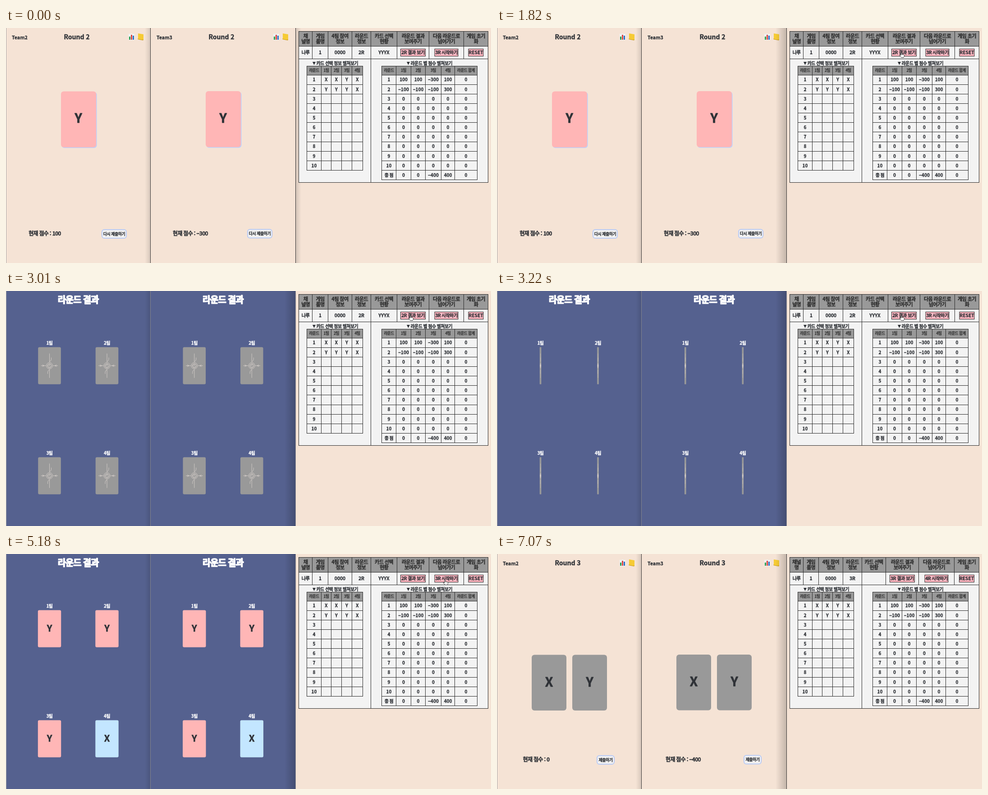
An HTML page for the animation above (7420 ms loop, 1076 by 521 pixels).

```html
<!DOCTYPE html>
<html lang="ko">
<head>
<meta charset="utf-8">
<style>
  html, body { margin: 0; width: 100%; height: 100%; overflow: hidden; background: #f5e3d5; }
  svg { display: block; width: 1076px; height: 521px; }
  text {
    font-family: "Noto Sans CJK KR", "Noto Sans CJK", "Noto Sans", sans-serif; font-weight: 700;
    stroke-width: .03em; stroke-linejoin: round;
  }
  .ko { letter-spacing: -.06em; }
  .title { font-weight: 900; stroke-width: .07em; }
  .divider { fill: #333; }
  .dim .divider { fill: #85878f; }
</style>
</head>
<body>
<svg id="stage" viewBox="0 0 1076 521"></svg>
<script>
const LOOP = 7420, RESULT_AT = 1890, FLIP_AT = 2939, FLIP_TIME = 1000, NEXT_AT = 5390, FOCUS_AT = 1200;
const INK = '#2f3237', LINE = '#2a2a2a', GRAY = '#999', PINK = '#ffb6b6', SKY = '#c3e6ff', BLUE = '#55618f';

const rect = (x, y, w, h, fill, extra = '') =>
  `<rect x="${x}" y="${y}" width="${w}" height="${h}" fill="${fill}" ${extra}/>`;
const path = (d, extra) => `<path d="${d}" ${extra}/>`;
const group = (id, body) => `<g id="${id}">${body}</g>`;
// y is the visual middle of the line; negative numbers get a true minus sign
const text = (x, y, size, s, fill = INK, anchor = 'middle', style = '') =>
  `<text x="${x}" y="${y + size * .36}" font-size="${size}" fill="${fill}" stroke="${fill}" text-anchor="${anchor}"` +
  ` class="${/[가-힣]/.test(s) ? 'ko' : ''} ${style}">${String(s).replace('-', '−')}</text>`;

function icons(x) {
  const bar = (dx, h, fill) => rect(x + dx, 26 - h, 3, h, fill);
  return rect(x, 13, 13, 14, '#eef3f6') + bar(1, 7, '#2f9e4f') + bar(5, 11, '#d9433f') + bar(9, 9, '#2b6fc4') +
    path(`M${x + 21} 12l12 2v13l-12-2z`, 'fill="#f6cb34"') +
    path(`M${x + 20} 24l2 1 10 2v-2`, 'fill="none" stroke="#c99a1c"');
}

function pill(cx, y, w, label) {
  return rect(cx - w / 2, y, w, 19, '#f2f1f1', 'rx="5" stroke="#b9cbf5" stroke-width="2"') +
    text(cx, y + 9.5, 9, label);
}

function roundPanel(p, round) {
  const x = p * 321, y = p * -.5, first = round === 2;
  const score = first ? [100, -300][p] : [0, -400][p];
  const cards = first
    ? rect(x + 123.5, y + 142, 78, 124, '#bdcffa', 'rx="6"') +
      rect(x + 122, y + 140.5, 78, 124, PINK, 'rx="6"') + text(x + 160.5, 200, 28, 'Y')
    : ['X', 'Y'].map((c, i) => rect(x + 77 + i * 90, y + 223.5, 77, 123.5, GRAY, 'rx="6"') +
        text(x + 115.5 + i * 90, y + 283.5, 28, c)).join('');
  return text(x + 13, 21, 10.7, 'Team' + (p + 2), INK, 'start') +
    text(x + 157, 20, 14, 'Round ' + round) + icons(x + 272) + cards +
    text((first ? 86 : 87) + p * (first ? 323 : 326), 456 + y, 12, '현재 점수 : ' + score) +
    (first ? pill(240 + p * 323, 447 + y, 54, '다시 제출하기') : pill(241 + p * 326, 447 + y, 38, '제출하기'));
}

const cardBack = rect(-25.7, -41.2, 51.4, 82.4, GRAY, 'rx="3"') +
  '<g fill="none" stroke="#e2dad4" stroke-width=".75">' +
  path('M0-27V-8M0 8V27M-19 0H-8M8 0H19M-16-2l4 2-4 2M16-2l-4 2 4 2M0-9Q5-11 4-18M0 9Q-5 11-4 18' +
       'M-3 1A3 3 0 0 1 3-1M3 1A3 3 0 0 1-3 2M0-2V2', '') +
  '<circle r="7"/><circle r="4.6"/></g>';

function resultPanel(p) {
  const x = p * 321.3;
  return rect(p ? 320 : 1, 0, p ? 322 : 319, 521, BLUE) +
    text(x + 160, 19.5, 20, '라운드 결과', '#fff', 'middle', 'title') +
    [...'YYYX'].map((c, i) => {
      const cx = x + 96.5 + i % 2 * 127.5, cy = 165.6 + (i >> 1) * 244;
      return text(cx, cy - 50.5, 10, i + 1 + '팀', '#fff') +
        `<g transform="translate(${cx} ${cy})"><g class="card"><g>${cardBack}</g>` +
        `<g>${rect(-25.7, -41.2, 51.4, 82.4, c === 'X' ? SKY : PINK, 'rx="3"')}${text(0, -1, 20, c)}</g></g></g>`;
    }).join('');
}

function grid(xs, ys) {
  const d = xs.map(x => `M${x + .5} ${ys[0]}V${ys.at(-1) + 1}`).join('') +
    ys.map(y => `M${xs[0]} ${y + .5}H${xs.at(-1) + 1}`).join('');
  return path(d, `fill="none" stroke="${LINE}"`);
}

function scoreTable(xs, heads, rows) {
  const ys = [84];
  for (let i = 0; i <= rows.length; i++) ys.push(Math.floor(104 + i * 21.15));
  const cells = (list, y, size, fill) =>
    list.map((s, i) => text((xs[i] + xs[i + 1]) / 2 + .5, y, size, s, fill)).join('');
  return rect(xs[0], 84, xs.at(-1) - xs[0], 20, GRAY) + cells(heads, 94, 8.6, '#393939') +
    rows.map((r, i) => cells(r, 114.8 + i * 21.15, 10)).join('') + grid(xs, ys);
}

function topTable(round) {
  const first = round === 2;
  const xs = first ? [649, 679, 714, 767, 809, 867, 938, 1015, 1069] : [649, 679, 713, 767, 809, 862, 935, 1014, 1069];
  const heads = [first ? '채|널명' : '채널|명', '게임|룸명', '4팀 참여|정보', '라운드|정보', '카드 선택|현황',
    '라운드 결과|보여주기', '다음 라운드로|넘어가기', '게임 초기|화'];
  const values = ['나루', '1', '0000', round + 'R', first ? 'YYYX' : '',
    round + 'R 결과 보기', round + 1 + 'R 시작하기', 'RESET'];
  const widths = [55, 52, 33];
  return rect(649, 7, 421, 33, GRAY) + heads.map((h, i) => {
    const cx = (xs[i] + xs[i + 1]) / 2 + .5;
    return h.split('|').map((s, j) => text(cx, 17.8 + j * 11.8, 11.2, s, '#303030')).join('') +
      (i > 4 ? rect(cx - widths[i - 5] / 2, 46.5, widths[i - 5], 16, '#ffb6c1', `stroke="${LINE}"`) : '') +
      text(cx, 54.5, 10.3, values[i]);
  }).join('') + grid(xs, [7, 40, 68]);
}

function scorePanel() {
  const picks = ['XXYX', 'YYYX'], points = [[100, 100, -300, 100], [-100, -100, -100, 300]];
  const rounds = Array.from({ length: 10 }, (_, i) => i + 1), teams = ['1팀', '2팀', '3팀', '4팀'];
  const title = (x, s) => path(`M${x} 75h7l-3.5 7z`, `fill="${INK}"`) + text(x + 8.5, 78.5, 10, s, INK, 'start');
  return rect(649, 7, 421, 336, '#f3f3f3') +
    title(680, '카드 선택 정보 펼쳐보기') + title(889, '라운드 별 점수 펼쳐보기') +
    scoreTable([667, 699, 721, 744, 767, 791], ['라운드', ...teams], rounds.map(n => [n, ...(picks[n - 1] || '')])) +
    scoreTable([833, 865, 898, 930, 965, 995, 1045], ['라운드', ...teams, '라운드 합계'],
      [...rounds.map(n => [n, ...(points[n - 1] || [0, 0, 0, 0]), 0]), ['총 점', 0, 0, -400, 400, 0]]) +
    grid([649, 809, 1069], [68, 342]);
}

const shade = (id, from, to) => `<linearGradient id="${id}">
  <stop offset="0" stop-opacity="${from}"/><stop offset="1" stop-opacity="${to}"/></linearGradient>`;
const cursorStyle = 'fill="#fff" stroke="#222" stroke-width=".9" stroke-linejoin="round"';
const divider = x => rect(x, 0, 1, 521, '#333', 'class="divider"');

stage.innerHTML = `<defs>${shade('toRight', 0, .2)}${shade('toLeft', .14, 0)}</defs>` +
  rect(0, 0, 1076, 521, '#f5e3d5') +
  group('round2', roundPanel(0, 2) + roundPanel(1, 2)) +
  group('round3', roundPanel(0, 3) + roundPanel(1, 3)) +
  group('result', resultPanel(0) + resultPanel(1)) +
  rect(308, 0, 12, 521, 'url(#toRight)', 'opacity=".6"') +
  rect(618, 0, 24, 521, 'url(#toRight)', 'id="rightFocus"') +
  rect(643, 0, 12, 521, 'url(#toLeft)', 'id="leftFocus"') +
  rect(0, 0, 1, 521, '#aaa') + divider(320) + divider(642) +
  scorePanel() + group('top2', topTable(2)) + group('top3', topTable(3)) +
  group('cursor',
    group('arrow', path('M0 0v11l2.6-2.4 1.8 4 1.7-.8-1.8-3.8h3.6z', 'fill="#111" stroke="#fff" stroke-width=".8"')) +
    group('hand', path('M-1 1q1-1.6 2 0v4q1-1 2 0 1-.8 2 .2 1.6-.5 1.6 1v2.5l-1.3 2.8H0L-3.8 7q0-1.6 1.4-1L-1 7z', cursorStyle)));

const cursorPath = [[300, 560, 535], [840, 625, 400], [1540, 897, 56], [1610, 897, 54], [4000, 897, 54],
  [4200, 953, 57], [4270, 953, 57], [4620, 974, 57], [5880, 974, 57], [6300, 1000, 398]];
const cards = [...document.querySelectorAll('.card')];
const $ = id => document.getElementById(id);
const show = (el, on) => el.style.display = on ? '' : 'none';

// cubic-bezier(.25, .1, .25, 1)
function ease(x) {
  if (x <= 0 || x >= 1) return x <= 0 ? 0 : 1;
  const bezier = (s, a, b) => 3 * s * (1 - s) ** 2 * a + 3 * s * s * (1 - s) * b + s ** 3;
  let lo = 0, hi = 1;
  for (let i = 0; i < 24; i++) {
    const mid = (lo + hi) / 2;
    if (bezier(mid, .25, .25) < x) lo = mid; else hi = mid;
  }
  return bezier(lo, .1, 1);
}

function moveCursor(t) {
  const i = cursorPath.findIndex(k => k[0] > t);
  show($('cursor'), i > 0);
  if (i < 1) return;
  const [t0, x0, y0] = cursorPath[i - 1], [t1, x1, y1] = cursorPath[i];
  const u = (t - t0) / (t1 - t0), k = u * u * (3 - 2 * u);
  const x = x0 + (x1 - x0) * k, y = y0 + (y1 - y0) * k;
  const onButton = y > 46 && y < 63 && (x > 875 && x < 931 || x > 948 && x < 1003);
  $('cursor').setAttribute('transform', `translate(${x} ${y})`);
  show($('hand'), onButton);
  show($('arrow'), !onButton);
}

function draw(t) {
  const next = t >= NEXT_AT, result = t >= RESULT_AT && !next;
  show($('round2'), t < RESULT_AT);
  show($('result'), result);
  show($('round3'), next);
  show($('top2'), !next);
  show($('top3'), next);
  show($('rightFocus'), t >= FOCUS_AT);
  show($('leftFocus'), t < FOCUS_AT);
  stage.classList.toggle('dim', result);
  const turn = Math.cos(Math.PI * ease((t - FLIP_AT) / FLIP_TIME));
  for (const card of cards) {
    card.setAttribute('transform', `scale(${Math.abs(turn)} 1)`);
    show(card.children[0], turn > 0);
    show(card.children[1], turn <= 0);
  }
  moveCursor(t);
}

const start = performance.now();
function tick() {
  draw((performance.now() - start) % LOOP);
  requestAnimationFrame(tick);
}
tick();
</script>
</body>
</html>
```
